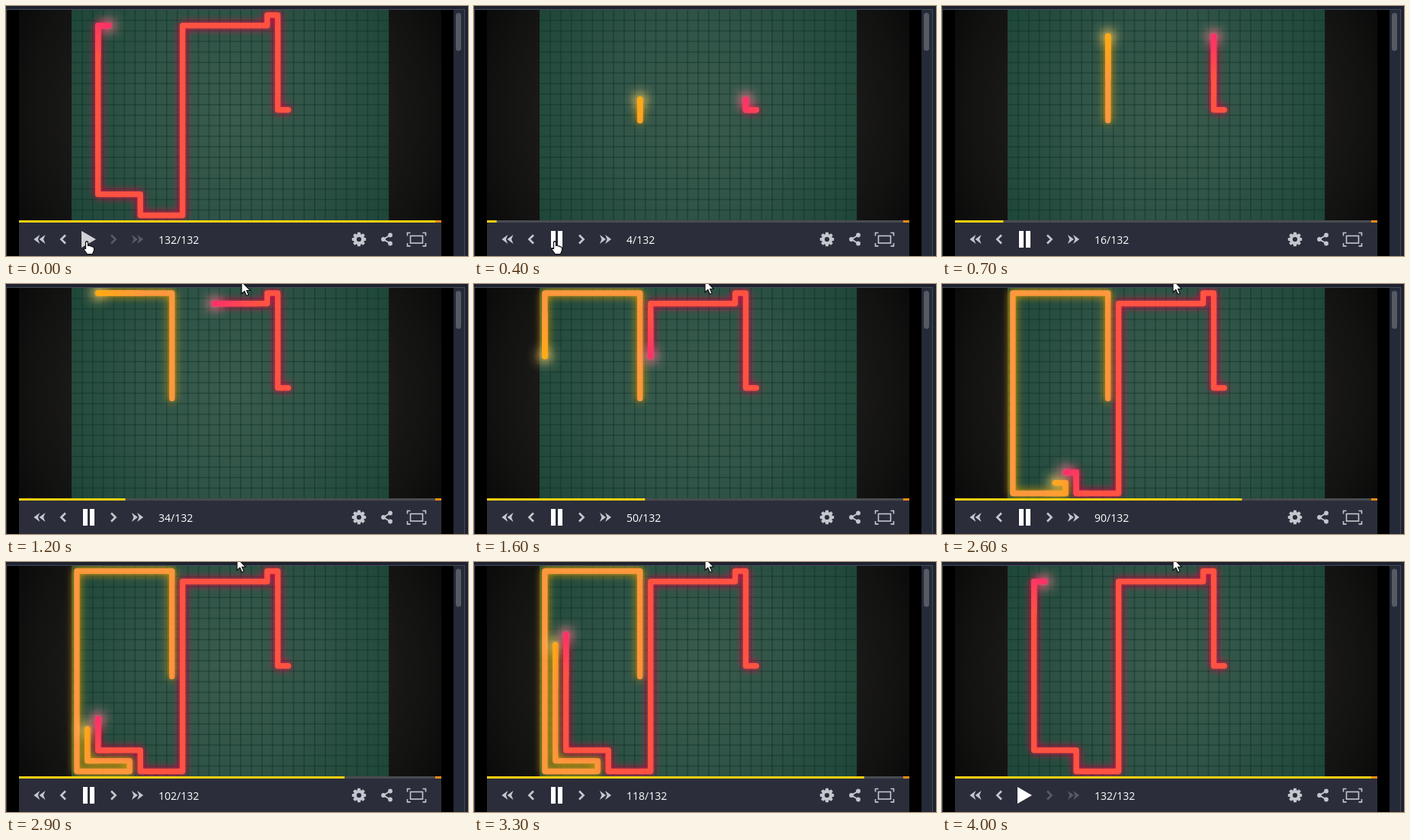
These frames come from a looping animation (606 px wide and 329 px high, 4.3 s). An HTML page with a canvas:

```html
<!DOCTYPE html>
<html lang="en">
<head>
<meta charset="utf-8">
<title>Replay player</title>
<style>
html, body { margin: 0; width: 100%; height: 100%; overflow: hidden; background: #1e2230; }
canvas { display: block; }
</style>
</head>
<body>
<canvas id="stage" width="606" height="329"></canvas>
<script>
const ctx = document.getElementById('stage').getContext('2d');
const LOOP = 4300, TICK = 100, TOTAL = 132;
const LEFT = 86, TOP = 5, CELL = 13.87, COLS = 30, ROWS = 20;
const BAR_X = 17, BAR_W = 554;

const bikes = [
  { route: 'U10 L9 D19 R5 U1 L4 U17', start: [9, 10], body: [255, 152, 60], head: [255, 170, 20], glow: '#ffae00', halo: '255,215,130' },
  { route: 'L1 U9 L1 D1 L8 D18 L4 U2 L5 U16 R1', start: [20, 9], body: [255, 82, 66], head: [255, 48, 104], glow: '#ff0048', halo: '255,150,165' }
];
// The second rider's fourth-last leg is one column shorter than its opening run suggests.
bikes[1].route = bikes[1].route.replace('L5 U16', 'L4 U16');

const DIRS = { U: [0, -1], D: [0, 1], L: [-1, 0], R: [1, 0] };

function expand({ route, start }) {
  let [c, r] = start;
  const points = [start];
  for (const leg of route.split(' ')) {
    const [dx, dy] = DIRS[leg[0]];
    for (let i = +leg.slice(1); i > 0; i--) points.push([c += dx, r += dy]);
  }
  return points.map(([x, y]) => [LEFT + (x + 0.5) * CELL, TOP + (y + 0.5) * CELL]);
}
for (const b of bikes) b.points = expand(b);

function rect(color, x, y, w, h) {
  ctx.fillStyle = color;
  ctx.fillRect(x, y, w, h);
}

function poly(color, ...xy) {
  ctx.beginPath();
  for (let i = 0; i < xy.length; i += 2) ctx.lineTo(xy[i], xy[i + 1]);
  ctx.closePath();
  ctx.fillStyle = color;
  ctx.fill();
}

function line(points) {
  ctx.beginPath();
  for (const [x, y] of points) ctx.lineTo(x, y);
  ctx.stroke();
}

function disc(color, x, y, r) {
  ctx.beginPath();
  ctx.arc(x, y, r, 0, 7);
  ctx.fillStyle = color;
  ctx.fill();
}

function radial(x, y, r0, r1, stops) {
  const g = ctx.createRadialGradient(x, y, r0, x, y, r1);
  stops.forEach((s, i) => g.addColorStop(i / (stops.length - 1), s));
  return g;
}

function drawFrame() {
  rect('#1e2230', 0, 0, 606, 329);
  rect('#454a55', 0, 4, 602, 1);
  rect('#000', 1, 5, 586, 324);
  rect('#454a55', 0, 4, 1, 325);
  rect('#252a38', 587, 5, 14, 324);
  rect('#454a55', 601, 4, 1, 325);
  ctx.beginPath();
  ctx.roundRect(590, 9, 7, 50, 3.5);
  ctx.fillStyle = '#565a65';
  ctx.fill();
}

function drawBoard() {
  rect(radial(294, 143, 200, 325, ['#1b1a18', '#121211', '#080808']), BAR_X, TOP, BAR_W, 277);
  const w = COLS * CELL, h = ROWS * CELL;
  rect(radial(294, 143, 0, 250, ['#3a5b4e', '#305447', '#1e4638']), LEFT, TOP, w, h);
  const shade = 'rgba(10,48,36,.42)';
  for (let c = 1; c < COLS; c++) rect(shade, LEFT + c * CELL - 0.8, TOP, 1.6, h);
  for (let r = 1; r < ROWS; r++) rect(shade, LEFT, TOP + r * CELL - 0.8, w, 1.6);
}

function mix(a, b, k) {
  return `rgb(${a.map((v, i) => Math.round(v + (b[i] - v) * k))})`;
}

function drawTrail(bike, moves, alpha) {
  const pts = bike.points.slice(0, moves + 1);
  const last = pts.length - 1;
  const [hx, hy] = pts[last];
  ctx.save();
  ctx.globalAlpha = alpha;
  ctx.lineCap = ctx.lineJoin = 'round';
  ctx.lineWidth = 7.4;
  ctx.strokeStyle = mix(bike.body, bike.head, 0);
  ctx.shadowColor = bike.glow;
  ctx.shadowBlur = 11;
  line(pts);
  ctx.shadowBlur = 0;
  ctx.shadowColor = 'transparent';
  const halo = [0.5, 0.27, 0.08, 0].map(a => `rgba(${bike.halo},${a})`);
  disc(radial(hx, hy, 0, 24, halo), hx, hy, 24);
  // The newest four cells blend into the head colour.
  for (let i = Math.max(1, last - 3); i <= last; i++) {
    const [a, b] = [pts[i - 1], pts[i]];
    const g = ctx.createLinearGradient(...a, ...b);
    g.addColorStop(0, mix(bike.body, bike.head, 1 - (last - i + 1) / 4));
    g.addColorStop(1, mix(bike.body, bike.head, 1 - (last - i) / 4));
    ctx.strokeStyle = g;
    line([a, b]);
  }
  ctx.restore();
}

function chevron(x, dir, color) {
  ctx.strokeStyle = color;
  ctx.lineWidth = 2.6;
  ctx.lineCap = 'butt';
  ctx.lineJoin = 'miter';
  line([[x - 3 * dir, 301.5], [x + 2.6 * dir, 307], [x - 3 * dir, 312.5]]);
}

function arrows(x, dir, color) {
  for (const o of [x - 3.6, x + 3.6]) {
    poly(color, o - 4 * dir, 301, o + 4 * dir, 307, o - 4 * dir, 313, o - 1.5 * dir, 307);
  }
}

function drawGear(x, y, color) {
  ctx.save();
  ctx.translate(x, y);
  for (let i = 0; i < 8; i++) {
    poly(color, -2.6, -5, -1.8, -9.2, 1.8, -9.2, 2.6, -5);
    ctx.rotate(Math.PI / 4);
  }
  ctx.restore();
  disc(color, x, y, 7);
  disc('#2b2e3a', x, y, 3.1);
}

function drawControls(turn, playing, hover) {
  const icon = '#c4c7ce', forward = playing ? icon : '#575b67';
  rect('#2b2e3a', BAR_X, 282, BAR_W, 47);
  rect('#494b50', BAR_X, 282, BAR_W, 3);
  rect('#f8cf10', BAR_X, 282, BAR_W * (turn - 1) / (TOTAL - 1), 3);
  rect('#f18a12', 563, 282, 8, 3);

  arrows(44, -1, icon);
  chevron(75, -1, icon);
  if (playing) {
    rect('#fff', 101, 296, 6, 22);
    rect('#fff', 110, 296, 6, 22);
  } else {
    poly(hover ? '#d0d1d4' : '#fff', 99, 296, 118, 307, 99, 318);
  }
  chevron(141, 1, forward);
  arrows(172.5, 1, forward);

  ctx.font = '14px "Open Sans", "Noto Sans", sans-serif';
  ctx.fillStyle = '#fff';
  ctx.fillText(`${turn}/${TOTAL}`, 200, 313);

  drawGear(463, 307, icon);
  ctx.strokeStyle = icon;
  ctx.lineWidth = 1.9;
  line([[504, 301.5], [495, 307], [504, 312.5]]);
  for (const [x, y] of [[504, 301.5], [495, 307], [504, 312.5]]) disc(icon, x, y, 2.9);
  ctx.lineWidth = 1.6;
  ctx.strokeRect(530.5, 302.5, 16, 9.5);
  for (const sx of [-1, 1]) for (const sy of [-1, 1]) {
    const x = 538.5 + 12 * sx, y = 307.2 + 8.7 * sy;
    line([[x - 4 * sx, y], [x, y], [x, y - 4 * sy]]);
  }
}

function outlined(path, x, y) {
  ctx.save();
  ctx.translate(x, y);
  ctx.lineJoin = 'round';
  ctx.lineWidth = 1.2;
  ctx.strokeStyle = '#111';
  ctx.fillStyle = '#fff';
  const p = new Path2D(path);
  ctx.fill(p);
  ctx.stroke(p);
  ctx.restore();
}

const ARROW = 'M0 0V16L3.8 12.5L6.5 18.5L9.2 17.2L6.6 11.5H11.5Z';
const HAND = 'M3 1Q4.5-.5 6 1V6Q8 5 9 6.5Q11 6 11.5 7.5Q13.5 7 14 9V12L12 17H5L1 11.5Q0 9 3 10Z';

function drawCursor(ms) {
  if (ms < 500) outlined(HAND, 101.5, 309.5);
  else if (ms >= 1600) outlined(ARROW, 303, -5);
  else if (ms >= 1100) outlined(ARROW, 309, -3);
}

function turnAt(ms) {
  if (ms < 400 || ms >= 3800) return TOTAL;
  const step = Math.floor(ms / TICK) - 3;
  return Math.min(130, 4 * step - (ms >= 1000 ? 2 : 0));
}

function render(ms) {
  const turn = turnAt(ms);
  const playing = ms >= 400 && ms < 3800;
  const moves = Math.min(65, turn >> 1);
  const fade = playing ? 1 : ms < 400 ? 0 : Math.max(0, 1 - (Math.floor(ms / TICK) - 37) / 3);

  drawFrame();
  drawBoard();
  ctx.save();
  ctx.beginPath();
  ctx.rect(BAR_X, TOP, BAR_W, 277);
  ctx.clip();
  if (fade > 0) drawTrail(bikes[0], moves, fade);
  drawTrail(bikes[1], moves, 1);
  ctx.restore();
  drawControls(turn, playing, ms < 400);
  drawCursor(ms);
}

const begin = performance.now();
function loop() {
  render((performance.now() - begin) % LOOP);
  requestAnimationFrame(loop);
}
loop();
</script>
</body>
</html>
```
